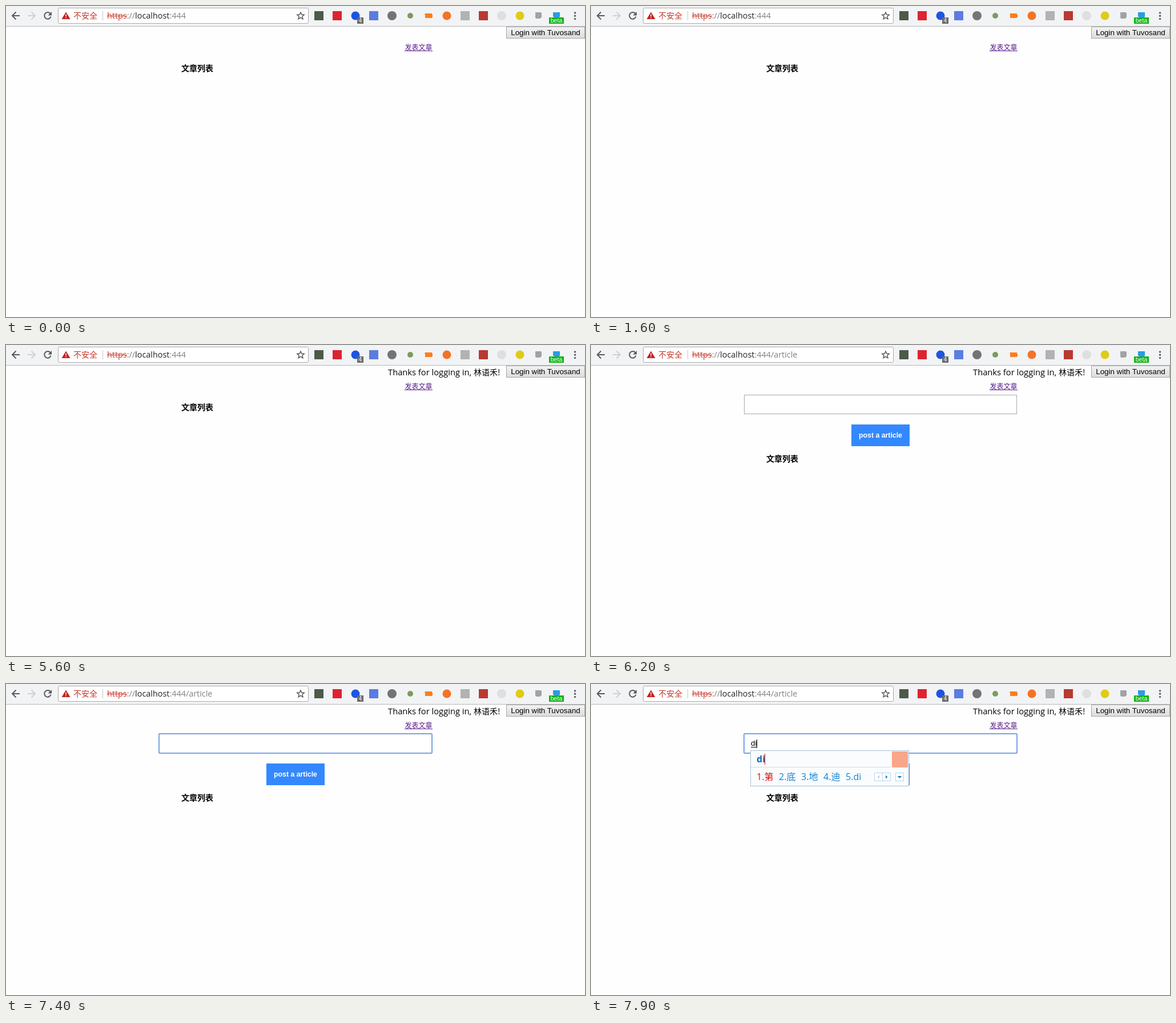
Write an HTML page that moves like this. It is 1014 px wide and 544 px high and loops after 8 s.

```html
<!DOCTYPE html>
<html lang="zh-CN">
<head>
<meta charset="utf-8">
<title>文章列表</title>
<style>
  html, body { margin: 0; width: 100%; height: 100%; overflow: hidden; background: #fefefe; }
  svg { display: block; white-space: pre; font-family: "Open Sans", "Noto Sans CJK SC", "Noto Sans CJK", sans-serif; }
  rect { shape-rendering: crispEdges; }
  .arial { font-family: "Liberation Sans", Arial, sans-serif; }
  .cjk { font-family: "Noto Sans CJK SC", "Noto Sans CJK", sans-serif; }
  .line { fill: none; stroke: #5a5a5a; stroke-width: 2; }
  .thin { fill: #fff; stroke: #b9d3e8; }
</style>
</head>
<body>
<svg width="1014" height="544" viewBox="0 0 1014 544">
  <defs>
    <linearGradient id="up" x2="0" y2="1"><stop stop-color="#f3f3f3"/><stop offset="1" stop-color="#dcdcdc"/></linearGradient>
    <linearGradient id="down" x2="0" y2="1"><stop stop-color="#dcdcdc"/><stop offset="1" stop-color="#f0f0f0"/></linearGradient>
  </defs>

  <!-- toolbar -->
  <rect width="1014" height="35" fill="#f2f3f5"/>
  <rect y="35" width="1014" height="1" fill="#b8b8ba"/>
  <path class="line" d="M24 17H11M17.5 10.5L11 17l6.5 6.5"/>
  <path class="line" style="stroke:#d0d0d2" d="M38 17h13M44.500 10.500L51 17l-6.500 6.500"/>
  <path class="line" d="M77.500 13.200A5.800 5.800 0 1 0 78.600 18.500"/>
  <path fill="#5a5a5a" d="M80 10v6.500h-6.500z"/>
  <rect x="91.500" y="3.500" width="438" height="27" rx="2" fill="#fff" stroke="#a9a9ab" style="shape-rendering:auto"/>
  <path fill="#c5221f" d="M105 10.500L112.500 23h-15z"/>
  <path stroke="#fff" stroke-width="1.500" d="M105 14.500v4M105 19.800v1.500"/>
  <text class="cjk" x="118" y="22" font-size="14" fill="#c53929">不安全</text>
  <rect x="169" y="9" width="1" height="16" fill="#c8c8c8"/>
  <text x="177" y="22" font-size="14.400" fill="#808080"><tspan fill="#c53929">https</tspan>://<tspan fill="#222">localhost</tspan>:444<tspan id="path"></tspan></text>
  <rect x="177" y="17" width="35" height="1" fill="#c53929"/>
  <path fill="none" stroke="#5a5a5a" stroke-width="1.500" d="M516 11l1.800 4 4.400.4-3.300 2.900 1 4.300-3.900-2.300-3.900 2.300 1-4.300-3.300-2.900 4.400-.4z"/>
  <g id="icons"></g>
  <rect x="615" y="20" width="11" height="11" fill="#6b6b6b"/>
  <rect x="951" y="20" width="26" height="11" fill="#0fb414"/>
  <g class="arial" font-size="10.500" fill="#fff" text-anchor="middle">
    <text x="620.500" y="29">4</text><text x="964" y="29">beta</text>
  </g>
  <g fill="#5a5a5a"><circle cx="996.500" cy="12" r="1.700"/><circle cx="996.500" cy="17.300" r="1.700"/><circle cx="996.500" cy="22.600" r="1.700"/></g>

  <!-- page -->
  <rect id="login" x="876.500" y="36.500" width="137" height="20"/>
  <text class="arial" x="945" y="51" font-size="13.333" text-anchor="middle">Login with Tuvosand</text>
  <g id="thanks">
    <text x="669" y="53" font-size="14.700">Thanks for logging in, </text>
    <text class="cjk" x="819" y="53" font-size="14">林语禾!</text>
  </g>
  <text class="cjk" x="698.500" y="77" font-size="12" fill="#551a8b">发表文章</text>
  <rect x="698" y="78" width="49" height="1" fill="#551a8b"/>
  <text class="cjk" id="heading" x="307" font-size="14" font-weight="700">文章列表</text>

  <g id="form">
    <rect x="268.500" y="87.500" width="477" height="33" fill="#fff" stroke="#a9a9a9"/>
    <rect id="focus" x="268" y="87" width="478" height="34" rx="1" fill="none" stroke="#7aa3e4" stroke-width="2" style="shape-rendering:auto"/>
    <text class="arial" id="typed" x="280" y="108" font-size="13.333"></text>
    <rect id="under" x="280" y="110" height="1"/>
    <rect id="caret" y="97" width="1" height="15"/>
    <rect x="456" y="139" width="102" height="38" fill="#3388ff"/>
    <text class="arial" x="507" y="162" font-size="12.320" font-weight="700" fill="#fff" text-anchor="middle">post a article</text>
  </g>

  <!-- input method window -->
  <g id="ime">
    <rect id="panel" x="279.500" y="116.500" height="62" fill="#fafcfe" stroke="#a9bfd2"/>
    <rect id="divider" x="280" y="145" height="1" fill="#c9d9e6"/>
    <text id="pinyin" x="290" y="137" font-size="16" font-weight="700" fill="#1266bd"></text>
    <rect id="mark" y="122" width="1" height="19" fill="#e01010"/>
    <g id="words" font-size="16"></g>
    <g id="side">
      <rect x="527" y="118" width="28" height="28" fill="#f8a68a"/>
      <rect class="thin" x="496.500" y="155.500" width="14" height="14"/>
      <rect class="thin" x="510.500" y="155.500" width="14" height="14"/>
      <rect class="thin" x="533.500" y="155.500" width="14" height="14"/>
      <path fill="#b4cfe4" d="M505 159.500v6l-3.500-3z"/>
      <path fill="#1482d2" d="M516 159.500v6l3.500-3zM536.500 161h8l-4 4z"/>
    </g>
  </g>
</svg>
<script>
const $ = id => document.getElementById(id);
const show = (id, on) => $(id).style.display = on ? '' : 'none';
const set = (id, attrs) => { for (const k in attrs) $(id).setAttribute(k, attrs[k]); };

// shape, colour, width, height, vertical centre; spaced 32 px apart
const icons = [
  ['sq', '#4c5a48', 16, 16, 17], ['sq', '#dc2430', 16, 16, 17], ['ci', '#1c55e2', 15, 15, 17],
  ['sq', '#5a7de0', 16, 16, 17], ['ci', '#747474', 16, 16, 17], ['ci', '#7c9c5c', 10, 10, 17],
  ['sq', '#ff7d1c', 13, 8, 17], ['ci', '#f47326', 15, 15, 17], ['sq', '#b2b2b2', 16, 16, 17],
  ['sq', '#b83a30', 16, 16, 17], ['ci', '#dfdfe0', 16, 16, 17], ['ci', '#dfcb18', 15, 15, 17],
  ['sq', '#a0a3a5', 11, 11, 16], ['sq', '#2b9be6', 12, 9, 15]
];
$('icons').innerHTML = icons.map(([kind, fill, w, h, y], i) => {
  const x = 548 + 32 * i;
  return kind === 'ci'
    ? `<circle cx="${x}" cy="${y}" r="${w / 2}" fill="${fill}"/>`
    : `<rect x="${x - w / 2}" y="${y - h / 2}" width="${w}" height="${h}" rx="1.5" fill="${fill}"/>`;
}).join('');

const looks = {
  normal: { fill: 'url(#up)', stroke: '#a6a6a6' },
  hover: { fill: 'url(#up)', stroke: '#7c7c7c' },
  pressed: { fill: 'url(#down)', stroke: '#7c7c7c' }
};
const typing = {
  d: { words: ['的', '都', '大家', '到底', '得'], extra: 36, caret: 287, mark: 300 },
  di: { words: ['第', '底', '地', '迪', 'di'], extra: 0, caret: 290, mark: 304 }
};

let last;
function type(text) {
  if (text === last) return;
  last = text;
  $('typed').textContent = $('pinyin').textContent = text;
  show('ime', text);
  show('under', text);
  if (!text) return set('caret', { x: 280 });
  const { words, extra, caret, mark } = typing[text];
  set('caret', { x: caret });
  set('under', { width: caret - 280 });
  set('mark', { x: mark });
  set('panel', { width: 277 + extra });
  set('divider', { width: 245 + extra });
  set('side', { transform: `translate(${extra} 0)` });
  let x = 290;
  $('words').innerHTML = words.map((word, i) => {
    const item = `<text x="${x}" y="168" fill="${i ? '#1482d2' : '#e01010'}">${i + 1}.${word}</text>`;
    x += 23 + 16 * (word === 'di' ? 1 : word.length);
    return item;
  }).join('');
}

function draw(t) {
  const within = (a, b) => t >= a && t < b;
  const pressed = within(1500, 1600);
  const hover = within(1200, 1500) || within(4900, 5600);
  set('login', looks[pressed ? 'pressed' : hover ? 'hover' : 'normal']);
  show('thanks', t >= 5200);
  const article = t >= 6200;
  $('path').textContent = article ? '/article' : '';
  set('heading', { y: article ? 204 : 114 });
  show('form', article);
  show('focus', t >= 6900);
  show('caret', within(6900, 7400) || t >= 7800);
  type(t >= 7900 ? 'di' : t >= 7800 ? 'd' : '');
}

const start = performance.now();
function frame() {
  draw((performance.now() - start) % 8000);
  requestAnimationFrame(frame);
}
frame();
</script>
</body>
</html>
```
